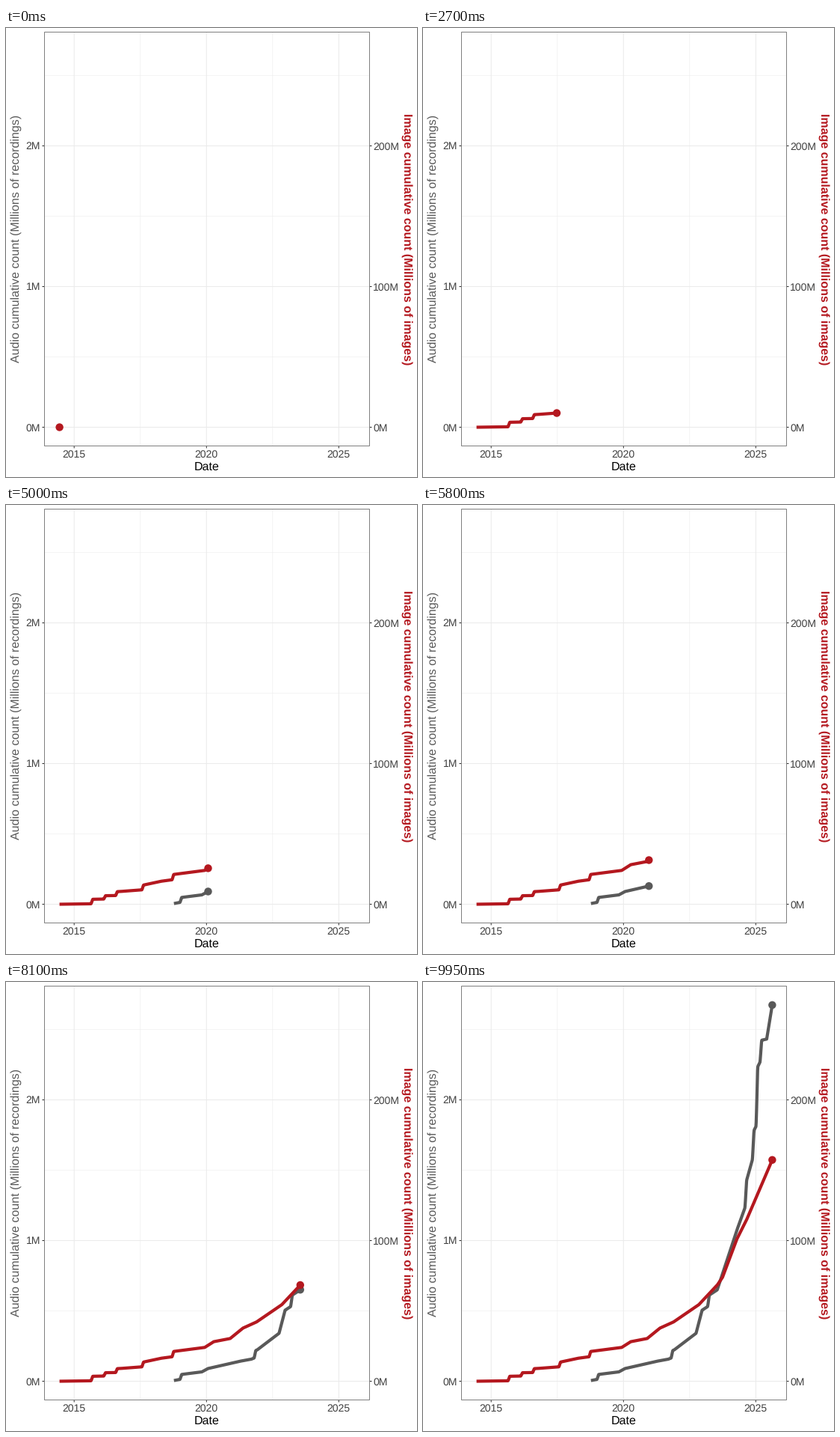
These frames come from a looping animation (550 by 600 pixels, 10 s). A matplotlib script:

```python
import matplotlib.pyplot as plt
import numpy as np
from matplotlib.animation import FuncAnimation
from matplotlib.patches import Circle, Rectangle

W, H, DPI = 550, 600, 100
PX = 72 / DPI  # points per pixel
FRAMES, INTERVAL = 200, 50

GREY, RED = "#595959", "#B4181F"
GRID, BORDER, TICK, LABEL = "#EBEBEB", "#7F7F7F", "#333333", "#404040"
LEFT, RIGHT, TOP, BOTTOM = 51.5, 486.5, 5.5, 558.5
START, END = 2014.447, 2025.62  # first and last date, in years
BURST = 0.08  # length of one bulk upload, in years

# Steady growth as (year, count) knots and bulk uploads as (year, amount).
# Images count in millions, audio in units of ten thousand.
IMAGE_KNOTS = [
    (START, 0), (2016.69, 0.6), (2017.56, 1.8), (2018.27, 4.7),
    (2019.93, 8.7), (2020.27, 12.8), (2020.89, 15), (2021.37, 22.4),
    (2021.88, 26.7), (2022.84, 39), (2023.54, 53), (2023.74, 58.5),
    (2024.28, 85.6), (2024.64, 99), (END, 142),
]
IMAGE_BURSTS = [(2015.67, 3.2), (2016.15, 2.4), (2016.6, 2.8),
                (2017.59, 3.2), (2018.73, 3.7)]
AUDIO_KNOTS = [
    (2018.77, 0.5), (2019, 1.3), (2019.82, 3.2), (2020.05, 5.6),
    (2021.23, 10.7), (2021.68, 12.2), (2021.91, 13.8), (2022.74, 25.6),
    (2022.97, 42.1), (2023.54, 49.1), (2024.28, 91.4), (2024.59, 107.5),
    (2024.86, 125.5), (2025.17, 137), (2025.41, 138), (END, 162.2),
]
AUDIO_BURSTS = [(2019.03, 3.4), (2021.83, 5), (2023.21, 7.4), (2024.62, 15.4),
                (2024.9, 19), (2025.04, 40), (2025.19, 15)]

plt.rcParams["font.family"] = "Liberation Sans"
plt.rcParams["text.hinting"] = "none"
plt.rcParams["path.snap"] = False

fig = plt.figure(figsize=(W / DPI, H / DPI), dpi=DPI, facecolor="white")
ax = fig.add_axes((0, 0, 1, 1))
ax.set_xlim(0, W)
ax.set_ylim(H, 0)
ax.axis("off")


def x_at(year):
    return 91.2 + 35.42 * (year - 2015)


def y_at(count):
    return 533.5 - 1.88 * count


def rule(x, y, color, width=1.07):
    ax.plot(x, y, color=color, lw=width * PX, solid_capstyle="butt")


def label(x, y, text, size, color, ha="center", **kw):
    ax.text(x, y, text, fontsize=size * PX, color=color, ha=ha,
            va="baseline", rotation_mode="anchor", **kw)


def grid(x=None, y=None, width=1.07):
    if x is None:
        rule((LEFT, RIGHT), (y, y), GRID, width)
    else:
        rule((x, x), (TOP, BOTTOM), GRID, width)


for year in (2017.5, 2022.5):
    grid(x=x_at(year), width=0.53)
for count in (50, 150, 250):
    grid(y=y_at(count), width=0.53)

for year in (2015, 2020, 2025):
    x = x_at(year)
    grid(x=x)
    rule((x, x), (BOTTOM, BOTTOM + 3), TICK)
    label(x - 0.7, 574.2, str(year), 14, LABEL)

for i in range(3):
    y = y_at(100 * i)
    grid(y=y)
    rule((LEFT - 3, LEFT), (y, y), TICK)
    rule((RIGHT, RIGHT + 3), (y, y), TICK)
    label(46, y + 5, f"{i}M", 14, LABEL, "right")
    label(491, y + 5, f"{100 * i}M", 14, LABEL, "left")

label(268.7, 591, "Date", 16, "black")
label(17.3, 281.8, "Audio cumulative count (Millions of recordings)", 16, GREY,
      rotation=90)
label(532.6, 281.8, "Image cumulative count (Millions of images)", 16, RED,
      rotation=270, weight="bold")
ax.add_patch(Rectangle((LEFT, TOP), RIGHT - LEFT, BOTTOM - TOP, fill=False,
                       ec=BORDER, lw=PX, zorder=8))


class Trace:
    """A cumulative curve revealed from the left with a dot at its head."""

    def __init__(self, knots, bursts, color, z):
        years, counts = zip(*knots)
        t = np.linspace(years[0], END, 1500)
        total = np.interp(t, years, counts)
        for when, amount in bursts:
            s = np.clip((t - when) / BURST + 0.5, 0, 1)
            total += amount * s * s * (3 - 2 * s)
        self.xs, self.ys = x_at(t), y_at(total)
        self.line, = ax.plot([], [], color=color, lw=4.2 * PX, zorder=z,
                             solid_capstyle="butt", solid_joinstyle="round")
        self.dot = ax.add_patch(Circle((0, 0), 5.2, color=color, lw=0,
                                       zorder=z + 0.5))

    def reveal(self, x):
        shown = self.xs <= x + 1e-6
        self.line.set_data(self.xs[shown], self.ys[shown])
        self.dot.set_visible(shown.any())
        self.dot.center = (x, np.interp(x, self.xs, self.ys))


traces = [Trace(AUDIO_KNOTS, AUDIO_BURSTS, GREY, 4),
          Trace(IMAGE_KNOTS, IMAGE_BURSTS, RED, 6)]


def update(frame):
    year = START + (END - START) * frame / (FRAMES - 1)
    for trace in traces:
        trace.reveal(x_at(year))
    return [artist for t in traces for artist in (t.line, t.dot)]


anim = FuncAnimation(fig, update, frames=FRAMES, interval=INTERVAL,
                     init_func=lambda: update(0), repeat=True, repeat_delay=0)
plt.show()
```
